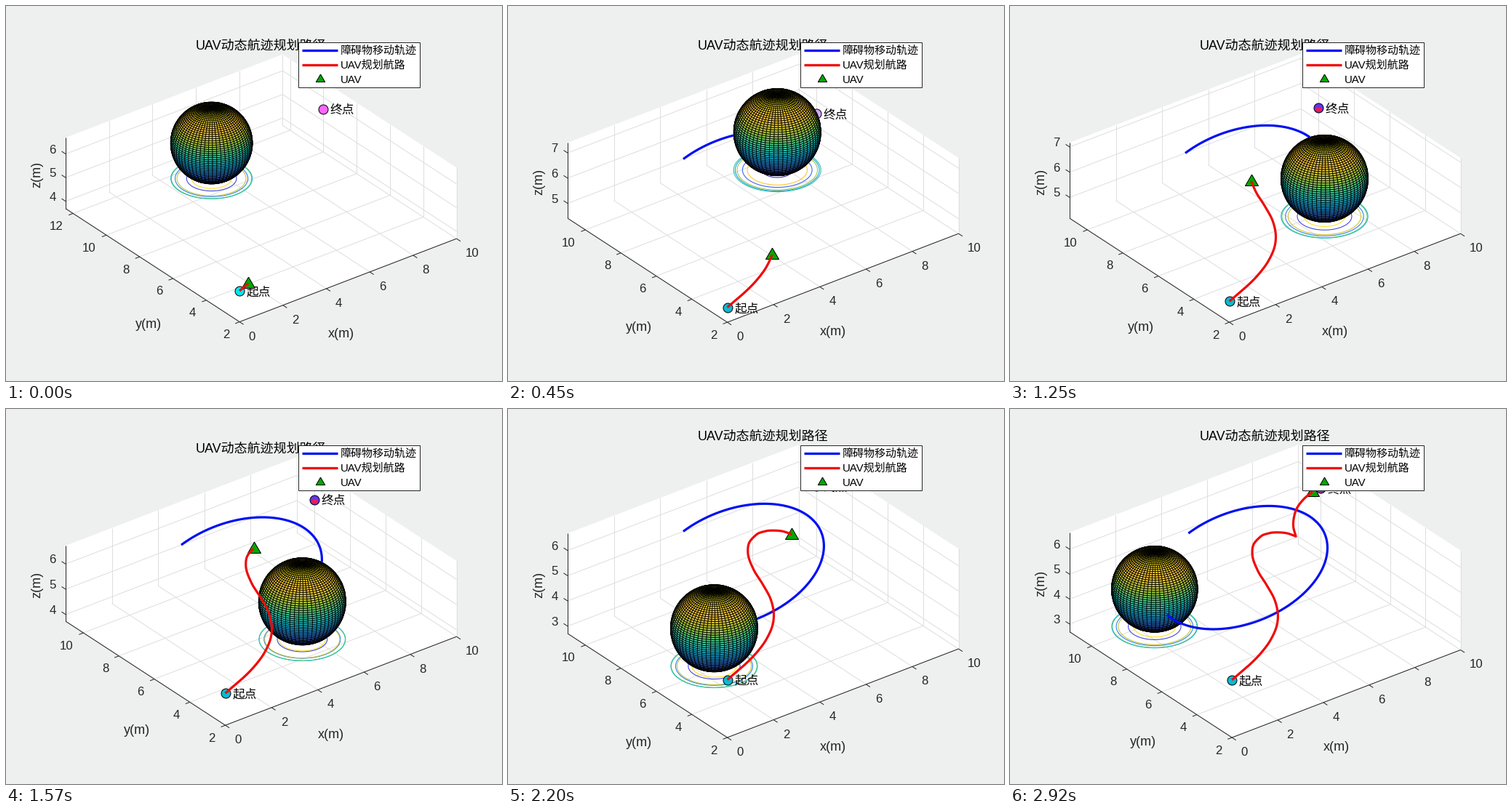
Recreate the animation shown at these times as a matplotlib script. Size 682 by 516 pixels, loop 3.13 s.

```python
import numpy as np
import matplotlib.pyplot as plt
from matplotlib.animation import FuncAnimation
from matplotlib.collections import LineCollection, PolyCollection
from matplotlib.patches import Polygon, Rectangle, Ellipse
from matplotlib.transforms import Affine2D

W, H, DPI = 682, 516, 64
PT = 72 / DPI                      # points per pixel
LOOP, TICK = 3130, 10
LEFT, RIGHT, MID_Y = 82, 619.5, 250.6
FONTS = ["Liberation Sans", "Noto Sans CJK JP"]
INK, BLUE, RED, GREEN = "#262626", "#0010f2", "#f00a0a", "#00a800"

AZ, EL = np.radians(37.5), np.radians(30)
CA, SA, CE, SE = np.cos(AZ), np.sin(AZ), np.cos(EL), np.sin(EL)
EYE = np.array([-SA * CE, -CA * CE, SE])
R = 1.5
START, GOAL = (0, 2, 5), (10, 10, 5.5)
Z_TOP = 6.68

# simulation steps last 30 ms, slower in the middle
STEP_TIMES = np.cumsum([30] * 25 + [50] * 14 + [30] * 47 + [60])

# UAV route: step, right and up from the start, in pixels at REF scale
REF = 40.11
OUT = np.array([(-3, 0, 0), (0, 12.8, 11), (2.7, 23, 19.8), (7.3, 40, 37),
                (12, 54.5, 57), (15, 61.5, 72.5), (18.5, 64, 90),
                (22.4, 60, 110), (27, 49, 131), (32, 36, 152),
                (37, 28.3, 175), (40, 30, 188.5), (43, 39, 199),
                (47.5, 50, 204), (54, 65, 205.5), (59.5, 78, 204),
                (64, 89, 200)])
BACK = np.array([(64, 89, 200), (68.5, 85.5, 213), (73.5, 86.5, 227.5),
                 (79, 92, 242), (83, 101, 253), (87, 112, 262)])


def hermite(knots, t):
    k = knots[:, 0]
    i = np.clip(np.searchsorted(k, t, side="right") - 1, 0, len(k) - 2)
    h = k[i + 1] - k[i]
    q = (t - k[i]) / h
    cols = []
    for v in knots[:, 1:].T:
        m = np.gradient(v, k)
        cols.append((1 + 2 * q) * (1 - q) ** 2 * v[i] + q * (1 - q) ** 2 * h * m[i]
                    + q * q * (3 - 2 * q) * v[i + 1] + q * q * (q - 1) * h * m[i + 1])
    return np.array(cols)


def route(step):
    t = np.append(np.arange(-3, step, 0.25), step)
    return np.where(t < 64, hermite(OUT, np.minimum(t, 64)),
                    hermite(BACK, np.maximum(t, 64)))


def angle(step):
    return np.radians(np.interp(step, [0, 43, 64, 87], [11, 166.7, 232.3, 305.8]))


def obstacle(a):
    return np.array([5 + 3 * np.sin(a), 8 + 3 * np.cos(a), 5 + np.sin(a)])


def flat(x, y, z):
    """Orthographic view: right and up, in data units."""
    return CA * x - SA * y, SE * (SA * x + CA * y) + CE * z


PARULA = np.array([(62, 38, 168), (72, 82, 244), (46, 135, 247), (18, 177, 214),
                   (55, 200, 151), (171, 199, 57), (254, 195, 56),
                   (249, 251, 21)]) / 255


def parula(v):
    return np.stack([np.interp(v, np.linspace(0, 1, 8), c) for c in PARULA.T], -1)


def sphere_mesh(n=60):
    lat, lon = np.meshgrid(np.linspace(-np.pi / 2, np.pi / 2, n + 1),
                           np.linspace(-np.pi, np.pi, n + 1), indexing="ij")
    p = R * np.stack([np.cos(lat) * np.cos(lon), np.cos(lat) * np.sin(lon),
                      np.sin(lat)], -1)
    quads = np.stack([p[:-1, :-1], p[:-1, 1:], p[1:, 1:], p[1:, :-1]], 2)
    quads = quads.reshape(-1, 4, 3)
    quads = quads[quads.mean(1) @ EYE > 0]
    u, v = flat(*np.moveaxis(quads, -1, 0))
    return np.stack([u, -v], -1), parula(quads[:, 0, 2] / (2 * R) + 0.5)


fig = plt.figure(figsize=(W / DPI, H / DPI), dpi=DPI, facecolor="#eef0ef")
ax = fig.add_axes([0, 0, 1, 1])
ax.set(xlim=(0, W), ylim=(H, 0))
ax.axis("off")


def label(x, y, s, px, ha="left", va="center", z=3, **kw):
    return ax.text(x, y, s, fontsize=px * PT, family=FONTS, weight="light", ha=ha,
                   va=va, color=kw.pop("color", INK), zorder=z, **kw)


def line(color, px, z, xs=(), ys=()):
    return ax.plot(xs, ys, color=color, lw=px * PT, zorder=z,
                   solid_capstyle="butt", solid_joinstyle="round")[0]


def dot(marker, px, color, z, x=0, y=0):
    return ax.plot([x], [y], marker=marker, ms=px * PT, mfc=color, mec="black",
                   mew=PT, ls="", zorder=z)[0]


TRIANGLE = [(0, 9.5), (-9, -6), (9, -6), (0, 9.5)]

room = ax.add_patch(Polygon([(0, 0)] * 6, fc="white", ec="none", zorder=0))
grid = ax.add_collection(LineCollection([], colors="#dedede", lw=PT, zorder=1))
frame_lines = ax.add_collection(LineCollection([], colors=INK, lw=PT, zorder=2))
ticks = {"x": {v: label(0, 0, str(v), 16.7, "left", "center_baseline") for v in range(0, 11, 2)},
         "y": {v: label(0, 0, str(v), 16.7, "right", "center_baseline") for v in range(2, 13, 2)},
         "z": {v: label(0, 0, str(v), 16.7, "right", "center_baseline") for v in range(2, 8)}}
x_name = label(0, 0, "x(m)", 18, "center")
y_name = label(0, 0, "y(m)", 18, "center")
z_name = label(43, 0, "z(m)", 18, "center", rotation=90)
title = label(350, 0, "UAV动态航迹规划路径", 18, "center", color="black")

rings = ax.add_collection(LineCollection([], lw=1.1 * PT, zorder=4))
goal = dot("o", 13, "#ff64ff", 5)
goal_spot = ax.add_patch(Ellipse((0, 0), 9, 6, fc="#e61e5a", ec="none", zorder=5.1))
goal_name = label(0, 0, "终点", 16.7, z=5, color="black")
quads, tints = sphere_mesh()
place = Affine2D()
ax.add_collection(PolyCollection(quads, facecolors=tints, edgecolors="black",
                                 lw=0.8 * PT, zorder=6,
                                 transform=place + ax.transData), autolim=False)
trail = line(BLUE, 3.2, 7)
begin = dot("o", 13, "#00e5ee", 8)
begin_name = label(0, 0, "起点", 16.7, z=8, color="black")
uav = dot(TRIANGLE, 19, GREEN, 9)
path = line(RED, 3.2, 10)

ax.add_patch(Rectangle((402, 50), 167, 62, fc="white", ec=INK, lw=PT, zorder=11))
line(BLUE, 3.3, 12, (407, 456), (61, 61))
line(RED, 3.3, 12, (407, 456), (81, 81))
dot(TRIANGLE, 13, GREEN, 12, 432, 99.5)
for row, words in zip((62, 81.5, 101.5), ("障碍物移动轨迹", "UAV规划航路", "UAV")):
    label(459.5, row, words, 15, z=12, color="black")


def draw(step):
    a = angle(step)
    c = obstacle(a)
    y1 = max(11, c[1] + R)
    z0, z1 = c[2] - R, max(Z_TOP, c[2] + R)
    s = (RIGHT - LEFT) / (10 * CA + (y1 - 2) * SA)
    ox = RIGHT - 10 * CA * s
    height = s * (SE * (10 * SA + (y1 - 2) * CA) + CE * (z1 - z0))
    oy = MID_Y + height / 2

    def at(x, y, z):
        u, v = flat(x, y - 2, z - z0)
        return ox + s * u, oy - s * v

    def seg(p, q):
        return [at(*p), at(*q)]

    room.set_xy([at(0, 2, z0), at(10, 2, z0), at(10, 2, z1),
                 at(10, y1, z1), at(0, y1, z1), at(0, y1, z0)])

    # grid, axes, tick marks and numbers
    net = []
    marks = [seg((0, 2, z0), (10, 2, z0)), seg((0, 2, z0), (0, y1, z0)),
             seg((0, y1, z0), (0, y1, z1))]

    def tick(text, p, mark, shift):
        marks.append([p, (p[0] + mark[0], p[1] + mark[1])])
        text.set_position((p[0] + shift[0], p[1] + shift[1]))

    for v, text in ticks["x"].items():
        net += [seg((v, 2, z0), (v, y1, z0)), seg((v, y1, z0), (v, y1, z1))]
        tick(text, at(v, 2, z0), (5.5, 3.6), (12.5, 19))
    for v, text in ticks["y"].items():
        text.set_visible(v <= y1)
        if v <= y1:
            net += [seg((0, v, z0), (10, v, z0)), seg((10, v, z0), (10, v, z1))]
            tick(text, at(0, v, z0), (-6, 2.3), (-14, 16.5))
    for v, text in ticks["z"].items():
        text.set_visible(z0 <= v <= z1)
        if z0 <= v <= z1:
            net += [seg((0, y1, v), (10, y1, v)), seg((10, 2, v), (10, y1, v))]
            tick(text, at(0, y1, v), (-5.5, -3.6), (-13, -7))
    grid.set_segments(net)
    frame_lines.set_segments(marks)

    d = REF - s
    mx, my = at(5, 2, z0)
    x_name.set_position((mx - 14 + 1.9 * d, my + 74))
    mx, my = at(0, (2 + y1) / 2, z0)
    y_name.set_position((mx - 12 + 2.7 * d, my + 79 + 1.2 * d))
    z_name.set_y(at(0, y1, (z0 + z1) / 2)[1] + 2)
    title.set_y(oy - height - 11)

    # obstacle with its contour rings on the floor
    px, py = at(*c)
    place.clear().scale(s).translate(px, py)
    levels = np.arange(np.ceil(2 * z0) / 2, c[2] + R, 0.5)
    turn = np.linspace(0, 2 * np.pi, 73)
    loops = []
    for lev in levels:
        r = np.sqrt(max(R * R - (lev - c[2]) ** 2, 0))
        loops.append(np.column_stack(at(c[0] + r * np.cos(turn),
                                        c[1] + r * np.sin(turn), z0)))
    rings.set_segments(loops)
    rings.set_color(parula((levels - c[2]) / (2 * R) + 0.5))

    # trail, hidden inside and behind the ball
    pts = obstacle(np.linspace(0, a, 400))
    rel = pts - c[:, None]
    depth = EYE @ rel
    off = (rel ** 2).sum(0) - depth ** 2
    hidden = (off < R * R) & (depth < np.sqrt(np.maximum(R * R - off, 0)))
    tx, ty = at(*pts)
    trail.set_data(np.where(hidden, np.nan, tx), ty)

    # start, goal and UAV
    gx, gy = at(*GOAL)
    goal.set_data([gx], [gy])
    goal.set_markerfacecolor("#ff64ff" if step < 12 else "#cfa6f5" if step < 30 else "#6a32f0")
    goal_spot.set_center((gx, gy + 2.5))
    goal_spot.set_visible(step >= 30)
    goal_name.set_position((gx + 9.5, gy + 1.5))
    bx, by = at(*START)
    begin.set_data([bx], [by])
    begin.set_markerfacecolor("#00e5ee" if step == 0 else "#0cb9d2")
    begin_name.set_position((bx + 9.5, by + 1.5))
    u, v = route(step) * s / REF
    path.set_data(bx + u, by - v)
    uav.set_data([bx + u[-1]], [by - v[-1]])


shown = None


def update(i):
    global shown
    step = int(np.searchsorted(STEP_TIMES, i * TICK, side="right"))
    if step != shown:
        draw(step)
        shown = step
    return []


anim = FuncAnimation(fig, update, frames=LOOP // TICK, interval=TICK,
                     repeat=True, repeat_delay=0, blit=False)
plt.show()
```
